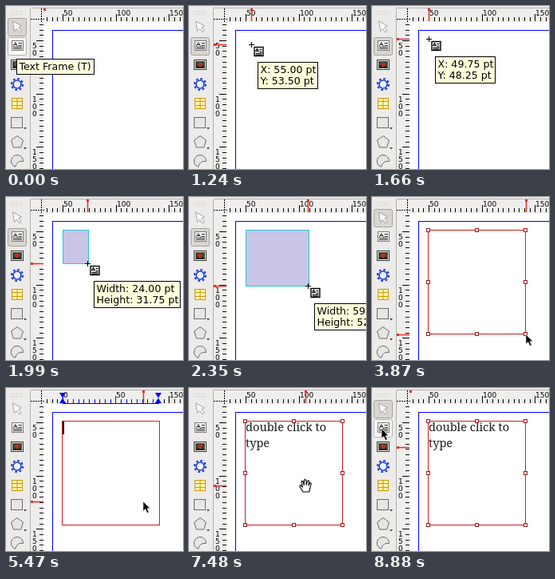
These frames come from a looping animation (222x204 px, 9550 ms). An HTML page:

```html
<!DOCTYPE html>
<html lang="en">
<head>
<meta charset="utf-8">
<title>Drawing a text frame</title>
<style>
html, body { margin: 0; width: 100%; height: 100%; overflow: hidden; background: #fff; }
svg { display: block; width: 222px; height: 204px; }
.crisp { shape-rendering: crispEdges; }
.num { font: 9px "DejaVu Sans", sans-serif; fill: #000; }
.tip { font: 12.6px "DejaVu Sans", sans-serif; fill: #000; }
.body { font: 14.6px "Noto Serif", serif; fill: #1c1c1c; }
</style>
</head>
<body>
<svg id="stage" viewBox="0 0 222 204" xmlns="http://www.w3.org/2000/svg"></svg>
<script>
const LOOP = 9550;
const PX = 4 / 3;                 // pixels per point
const ORIGIN = { x: 4.667, y: -23.333 };
const FRAME = { x: 70, y: 40.667 };

// Pointer path: time, x, y
const PATH = [
  [900, 50, 54], [1240, 78, 48], [1560, 71, 41], [1780, 71, 41],
  [1830, 79, 51], [1990, 102, 83], [2360, 150, 112], [2840, 188, 134],
  [2880, 189, 136], [2980, 189, 136], [3020, 190, 138], [3270, 190, 138],
  [3670, 193, 172], [4020, 193, 172], [4360, 178, 148], [4500, 178, 148],
  [4580, 174, 143], [5469, 174, 143], [5470, 172, 142], [5510, 172, 142],
  [5610, 170, 141], [7090, 170, 141], [7480, 146, 122], [8040, 48, 74],
  [8080, 45, 73], [8570, 17, 52], [8750, 17, 52], [8880, 12, 51]
];

const rect = (x, y, w, h, fill, stroke = "none", more = "") =>
  `<rect x="${x}" y="${y}" width="${w}" height="${h}" fill="${fill}" stroke="${stroke}" ${more}/>`;
const path = (d, fill, stroke = "none", more = "") =>
  `<path d="${d}" fill="${fill}" stroke="${stroke}" ${more}/>`;
const text = (x, y, cls, s) => `<text x="${x}" y="${y}" class="${cls}">${s}</text>`;
const group = (id, inner, more = "") => `<g id="${id}" ${more}>${inner}</g>`;

function ticksX(from, to, zero, color) {
  let d = "", labels = "";
  for (let pt = 0; pt <= 200; pt += 5) {
    const x = Math.floor(zero + pt * PX) + 0.5;
    if (x < from || x > to) continue;
    const major = pt % 50 === 0;
    d += `M${x} ${major ? 10 : 14}V19`;
    if (major) labels += text(x + 0.5, 12, "num", pt);
  }
  return path(d, "none", color, 'class="crisp"') + labels;
}

function ticksY() {
  let d = "", labels = "";
  for (let pt = 35; pt <= 170; pt += 5) {
    const y = Math.floor(ORIGIN.y + pt * PX) + 0.5;
    const major = pt % 50 === 0;
    d += `M${major ? 38 : 42} ${y}H47`;
    if (major) [...String(pt)].forEach((c, i) => labels += text(33, y + 9 + i * 9, "num", c));
  }
  return path(d, "none", "#000", 'class="crisp"') + labels;
}

function rulers() {
  const indent = x => path(`M${x - 4} 6H${x + 4}L${x} 12.5L${x + 4} 19H${x - 4}L${x} 12.5Z`, "#00f");
  return rect(31, 3, 191, 17, "#efeeec") + rect(31, 3, 16, 201, "#efeeec") +
    path("M31 16.5H48M44.5 3V20", "none", "#000", 'class="crisp" stroke-dasharray="2 1"') +
    ticksX(47, 222, ORIGIN.x, "#000") + ticksY() +
    group("textRuler",
      rect(70, 4, 123, 15, "#efeeec") + ticksX(70, 193, 71.3, "#00f") +
      path("M71 19.5H192", "none", "#00f", 'class="crisp"') + indent(71) + indent(191));
}

function textIcon(w, h, stroke, weight) {
  const mid = w / 2;
  return rect(0.5, 0.5, w - 1, h - 1, "#fff", stroke, `stroke-width="${weight}"`) +
    path(`M2 ${mid}L${mid / 2 + 1} 2.5L${mid} ${mid}M3 5.5H${mid - 1}` +
      `M${mid + 1} 3.5H${w - 2}M${mid + 1} 6.5H${w - 2}M2 8.5H${w - 2}M2 10.5H${w - 2}`,
      "none", "#222", `stroke-width="${weight}"`);
}

function gear(cx, cy) {
  return `<circle cx="${cx}" cy="${cy}" r="7" fill="none" stroke="#1838d8" stroke-width="2.2" stroke-dasharray="2.7 2.8"/>` +
    `<circle cx="${cx}" cy="${cy}" r="5" fill="#eef2fd" stroke="#1838d8" stroke-width="1.6"/>`;
}

function toolbar() {
  const button = (id, y, fill, stroke) =>
    rect(2.5, y + 0.5, 23, 22, fill, stroke, `id="${id}" rx="2"`);
  const menu = y => path(`M22 ${y}h4l-2 2.5z`, "#444");
  const light = "#e6e6e6", edge = "#6b6b6b";
  return rect(0, 0, 222, 3, "#edebe9") + rect(0, 0, 31, 204, "#edebe9") +
    path("M30.5 3V204M31 2.5H222", "none", "#b2afaa", 'class="crisp"') +
    path("M7 7.5H22M7 10.5H22", "none", "#bebbb6", 'class="crisp" stroke-dasharray="1 2"') +
    button("arrowOn", 15, "#d9d6d2", "#a5a19b") +
    button("textOn", 39, "#d9d6d2", "#a5a19b") +
    button("textHover", 39, "#faf9f8", "#b5b1ab") +
    path("M8.5 19L10.5 31.5L13.5 28.3L17 33L19.3 31.2L15.9 26.6L19.5 24.8Z", "#f8f8f8", "#a2a2a2") +
    `<g transform="translate(7 43)">${textIcon(15, 13, "#777", 1)}</g>` +
    rect(6.5, 67.5, 15, 12, "#f8f8f8", "#333") + rect(8, 69, 12, 9, "#3f4a38") +
    path("M8 78L11.5 74L14 76L16.5 74L20 78Z", "#1c2a1a") +
    `<circle cx="14" cy="73.2" r="2.7" fill="#c22a20"/>` +
    gear(14, 98) +
    rect(7.5, 115.5, 13, 13, "#fff3b0", "#c79a0a") +
    path("M14 116V128M8 119.5H20M8 124.5H20", "none", "#c79a0a") +
    rect(6.5, 139.5, 14, 13, light, edge) + menu(152) +
    path("M14 162.5L21.5 168L18.7 177H9.3L6.5 168Z", light, edge) + menu(177) +
    path("M11.5 201.3A7.6 7.6 0 1 1 21.5 194.5Q14 193 11.5 201.3Z", light, edge);
}

function handles() {
  let s = "";
  for (const x of [70, 131, 192]) for (const y of [41, 106, 171])
    if (x !== 131 || y !== 106) s += rect(x - 1.5, y - 1.5, 4, 4, "#fff", "#a01818");
  return s;
}

const cross = path("M-3 .5H4M.5 -3V4", "none", "#000", 'class="crisp"') +
  `<g transform="translate(3.5 3)">${textIcon(12, 12, "#000", 1.4)}</g>`;
const arrow = path("M0 0V12L2.8 9.5L5 14.4L7.2 13.4L5 8.7H8.8Z", "#000", "#fff", 'stroke-width=".6"');
const hand = path("M-3 8L-7 1.5Q-7.5 -.8 -5.5 0L-3.6 2L-5 -4.5Q-4.6 -6.5 -3.1 -5L-1.7 -.5V-6.5" +
  "Q-.4 -8.3 .9 -6.5L1.2 -.8L2.8 -5.8Q4.5 -6.8 4.8 -5L4 0L5.6 -3Q7.4 -3.6 7.2 -1.8L5.5 4.5L4.5 8Z",
  "#fff", "#000", 'stroke-width="1.1" stroke-linejoin="round"');

const RED = "#dc3030";
document.getElementById("stage").innerHTML =
  rect(0, 0, 222, 204, "#fff") +
  path("M58.5 204V30.5H222", "none", "#00f", 'class="crisp"') +
  rulers() +
  group("markX", path("M-1.5 3H1.5V6H-1.5Z", RED) +
    path("M0 6V19", "none", RED, 'id="stemX" stroke-width="1.5"')) +
  group("markY", path("M31 -1.5V1.5H34V-1.5Z", RED) +
    path("M34 0H47", "none", RED, 'stroke-width="1.5"')) +
  toolbar() +
  group("drag", rect(71.5, 41.5, 1, 1, "#c8c5e6", "#2cc4d4", 'id="dragBox"')) +
  group("frame", rect(70.5, 41.5, 122, 130, "none", "#cc1c1c"), 'class="crisp"') +
  group("words", text(71, 53.5, "body", "double click to") + text(71, 73.5, "body", "type")) +
  group("handles", handles(), 'class="crisp"') +
  rect(0, 0, 2, 16, "#000", "none", 'id="caret"') +
  group("cross", cross) + group("hand", hand) + group("arrow", arrow) +
  group("tip", rect(0.5, 0.5, 75, 33, "#ffffdc", "#000", 'id="tipBox" class="crisp"') +
    '<text id="tip1" class="tip" x="3.5" y="13.5"></text><text id="tip2" class="tip" x="3.5" y="28"></text>') +
  group("hint", rect(13.5, 66.5, 97, 19, "#ffffdc", "#000", 'class="crisp"') +
    text(16.5, 80, "tip", "Text Frame (T)"));

const el = {};
document.querySelectorAll("#stage [id]").forEach(e => el[e.id] = e);
const show = (id, on) => el[id].style.display = on ? "" : "none";
const move = (id, x, y) => el[id].setAttribute("transform", `translate(${x} ${y})`);
const within = (t, a, b) => t >= a && t < b;

function pointer(t) {
  let i = 0;
  while (i < PATH.length - 1 && PATH[i + 1][0] <= t) i++;
  const a = PATH[i], b = PATH[i + 1] || a;
  const k = b === a ? 0 : Math.max(0, (t - a[0]) / (b[0] - a[0]));
  return [1, 2].map(n => Math.round(a[n] + (b[n] - a[n]) * k));
}

function cursorKind(t, x) {
  if (t < 900) return "";
  if (t < 3870) return "cross";
  if (within(t, 4060, 4820) || within(t, 4870, 4930)) return "hand";
  return t >= 7130 && x > 70 ? "hand" : "arrow";
}

function tooltip(x, y, dragging) {
  const [w, h] = dragging
    ? [x - FRAME.x, y - FRAME.y] : [x - ORIGIN.x, y - ORIGIN.y];
  const pt = v => (Math.max(0, v) / PX).toFixed(2) + " pt";
  el.tip1.textContent = (dragging ? "Width: " : "X: ") + pt(w);
  el.tip2.textContent = (dragging ? "Height: " : "Y: ") + pt(h);
  const wide = dragging ? (h / PX < 10 ? 100 : 108) : 75;
  el.tipBox.setAttribute("width", wide);
  move("tip", x + 8, y + 22);
}

function render(t) {
  const [x, y] = pointer(t);
  const kind = cursorKind(t, x);
  const dragging = within(t, 1800, 3870);
  const editing = within(t, 5070, 7090);
  const onCanvas = within(t, 900, 8040);

  for (const id of ["cross", "hand", "arrow"]) {
    show(id, id === kind);
    move(id, x, y);
  }
  move("markX", (onCanvas ? x : 48) + 0.5, 0);
  move("markY", 0, (onCanvas ? y : 74) + 0.5);
  show("stemX", onCanvas);

  show("hint", t < 580);
  show("textHover", t < 580 || (t > 8080 && x < 26 && y < 62));
  show("textOn", within(t, 580, 3870));
  show("arrowOn", t < 670 || within(t, 3870, 5070) || t >= 7520);

  show("tip", within(t, 900, 3870));
  if (within(t, 900, 3870)) tooltip(x, y, dragging);
  show("drag", dragging);
  if (dragging) {
    el.dragBox.setAttribute("width", Math.max(1, x - FRAME.x));
    el.dragBox.setAttribute("height", Math.max(1, y - 41));
  }

  show("frame", t >= 3870);
  show("handles", t >= 3870 && !editing);
  show("textRuler", editing);
  show("words", t >= 5980);
  show("caret", within(t, 5110, 5760) || within(t, 5980, 6190) || within(t, 6780, 7090));
  if (t < 5980) move("caret", 71, 42);
  else move("caret", 100, 62.5);
}

const start = performance.now();
function tick() {
  render((performance.now() - start) % LOOP);
  requestAnimationFrame(tick);
}
tick();
</script>
</body>
</html>
```
